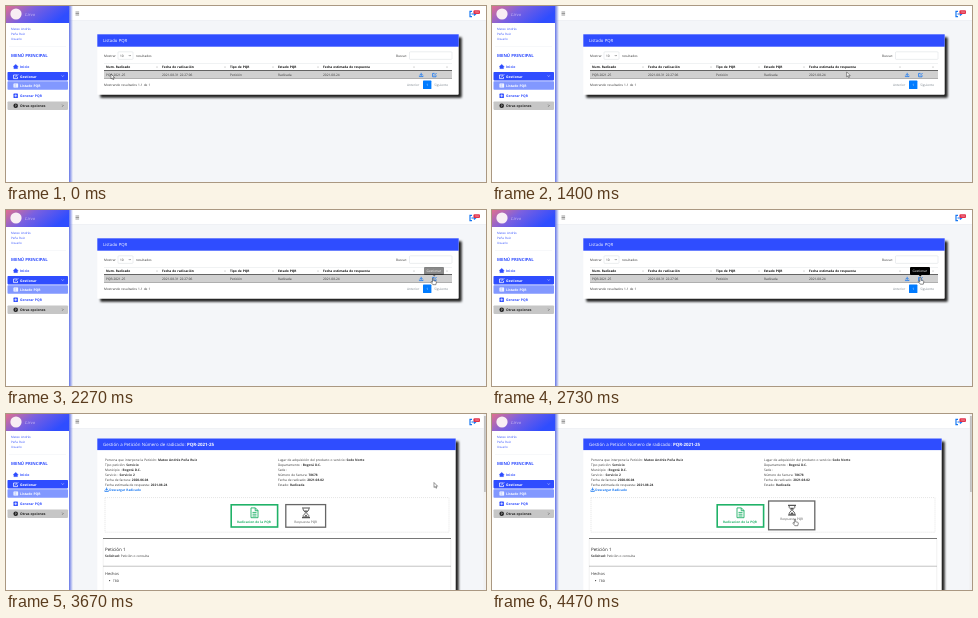
An HTML page for the animation above (4670 ms loop, 480 by 176 pixels).

```html
<!DOCTYPE html>
<html lang="es">
<head>
<meta charset="utf-8">
<title>Listado PQR</title>
<style>
html, body { margin: 0; width: 100%; height: 100%; overflow: hidden; background: #f4f6f9; }
svg { display: block; width: 100vw; height: 100vh; }
text { font: 3.2px "Open Sans", "Noto Sans", sans-serif; word-spacing: .2px; text-rendering: geometricPrecision; white-space: pre; }
.b { font-weight: 700; }
.head { filter: drop-shadow(3px 3px .9px #222); }
</style>
</head>
<body>
<svg id="stage" viewBox="0 0 480 176" preserveAspectRatio="none"></svg>
<script>
const BLUE = '#2f4dff', LINK = '#1677f2', GREEN = '#20b268', LOOP = 4670;
const stage = document.getElementById('stage');

const text = (x, y, s, { size = 3.2, fill = '#333', weight = 400 } = {}) =>
  `<text x="${x}" y="${y}" style="font-size:${size}px;fill:${fill};font-weight:${weight}">${s}</text>`;
const rect = (x, y, w, h, fill, extra = '') =>
  `<rect x="${x}" y="${y}" width="${w}" height="${h}" fill="${fill}" ${extra}/>`;
const path = (d, stroke, width = .7, fill = 'none') =>
  `<path d="${d}" fill="${fill}" stroke="${stroke}" stroke-width="${width}"/>`;
const field = (label, value = '') => `${label} <tspan class="b">${value}</tspan>`;
const download = (x, y) =>
  path(`M${x + 1.8} ${y}v2.6M${x + .5} ${y + 1.3}l1.3 1.3l1.3-1.3M${x} ${y + 2.8}v1h3.6v-1`, LINK, .8);

const menuItem = (y, label, fill, icon, back) =>
  (back ? rect(1.5, y - 5.6, 60.5, 8.5, back, 'rx=".8"') : '') + icon +
  text(14, y, label, { size: 3.4, fill, weight: 700 });

const sidebar = `
  ${rect(63, 0, 4, 176, 'url(#edge)')}${rect(0, 0, 63, 176, '#fff')}
  ${rect(0, 0, 63, 17, 'url(#brand)')}
  <circle cx="10" cy="8" r="5.6" fill="#f8eef4"/>
  <text x="19" y="10" style="font:italic 4px 'Noto Serif',serif;fill:#c9b8f2">Lirvo</text>
  ${['Mateo Andrés', 'Peña Ruiz', 'Usuario'].map((s, i) => text(5, 24 + 5 * i, s, { size: 3, fill: BLUE })).join('')}
  ${rect(3, 40, 57, .3, '#e3e6ee')}
  ${text(5, 51, 'MENÚ PRINCIPAL', { size: 4.25, fill: BLUE, weight: 700 })}
  ${menuItem(61.7, 'Inicio', BLUE, path('M7 60.7l2.7-2.4l2.7 2.4h-.8v2h-3.8v-2z', BLUE, .2, BLUE))}
  ${menuItem(71.5, 'Gestionar', '#fff', path('M7.5 69h3.5M7.5 69v3.6h4v-1.7M9 71.5l3.2-3.2', '#fff'), BLUE)}
  ${path('M55.7 69.5l1 1l1-1', '#fff', .5)}
  ${menuItem(80.8, 'Listado PQR', '#fff', rect(7.5, 77.4, 4.6, 4, '#fff', 'rx=".5"') + path('M8 78.8h3.6M8 80.2h3.6M9.3 77.8v3.3', '#8298ff', .3), '#8298ff')}
  ${menuItem(91, 'Generar PQR', BLUE, rect(7.5, 87.6, 4.4, 4.4, BLUE, 'rx=".6"') + path('M9.7 88.4v2.8M8.3 89.8h2.8', '#fff'))}
  ${menuItem(101, 'Otras opciones', '#222', '<circle cx="9.7" cy="99.7" r="2.3" fill="#222"/>' + text(8.9, 100.9, '?', { fill: '#fff', weight: 700 }), '#c6c6c6')}
  ${path('M56.2 98.7l1 1l-1 1', '#333', .5)}`;

const topbar = `
  ${rect(63, 0, 417, 14.5, '#fff')}${rect(63, 14.5, 417, .4, '#dfe3e8')}
  ${path('M69.5 6h3.6M69.5 7.5h3.6M69.5 9h3.6', '#555', .6)}
  ${path('M466 5.4h-2v5.2h2M465.5 8h4M468 6.3l1.7 1.7l-1.7 1.7', LINK, 1.2)}
  ${rect(467.5, 4.2, 6.5, 3.8, '#e2324b', 'rx="1"')}${text(468.7, 7.1, '100', { size: 2.4, fill: '#fff' })}`;

const columns = [
  [100, 'Num. Radicado', 'PQR-2021-25'],
  [156, 'Fecha de radicación', '2021-08-31 22:27:06'],
  [224, 'Tipo de PQR', 'Petición'],
  [272, 'Estado PQR', 'Radicada'],
  [317, 'Fecha estimada de respuesta', '2021-08-24'],
];
const control = (x, w) => rect(x, 45.8, w, 7.6, '#fff', 'rx=".8" stroke="#cfd4da" stroke-width=".4"');

const listPage = `<g id="list">
  <g class="head">${rect(91.3, 28.3, 361.4, 60.5, '#fff', 'rx=".8"')}</g>
  ${rect(91.3, 28.3, 361.4, 12.4, BLUE)}
  ${text(97, 36.2, 'Listado PQR', { size: 4.25, fill: '#fff' })}
  ${text(98, 51, 'Mostrar')}${control(112, 15)}${text(114, 51, '10')}
  ${path('M122.8 49.1l1 1l1-1', '#333', .5)}${text(130, 51, 'resultados')}
  ${text(390, 51, 'Buscar:')}${control(403.5, 42.5)}
  ${rect(98, 57, 348, .35, '#d5d9dd')}
  ${rect(98, 65, 348, 7.5, '#d0d0d0')}${rect(98, 64.2, 348, .7, '#222')}${rect(98, 72.4, 348, .5, '#777')}
  ${columns.map(([x, title, value]) => text(x, 62, title, { fill: '#111', weight: 700 }) + text(x, 69.8, value)).join('')}
  ${[151, 219, 267, 312, 408, 441].map(x => path(`M${x - .8} 60.8h1.6l-.8 1z`, 'none', 0, '#999')).join('')}
  ${download(413.4, 66.8)}
  ${path('M428.6 67.4h-2v3.4h3.4v-1.6M428 69.6l2.6-2.6', LINK, .8)}
  ${text(98, 80, 'Mostrando resultados 1-1 de 1')}
  ${text(401, 80, 'Anterior', { fill: '#7c858d' })}
  ${rect(417, 74.6, 8.4, 8.5, '#007bff', 'rx=".6"')}${text(420.3, 80, '1', { fill: '#fff' })}
  ${text(428.3, 80, 'Siguiente', { fill: '#7c858d' })}
  <g id="tip">${rect(418, 57, 20, 8, '#000', 'rx="1"')}${path('M426.8 65h2.8l-1.4 1.5z', 'none', 0, '#000')}
    ${text(420.6, 62.2, 'Gestionar', { fill: '#fff' })}</g>
</g>`;

const left = [
  field('Persona que interpone la Petición:', 'Mateo Andrés Peña Ruiz'),
  field('Tipo petición:', 'Servicio'),
  field('Municipio :', 'Bogotá D.C.'),
  field('Servicio :', 'Servicio 2'),
  field('Fecha de factura:', '2020-06-04'),
  field('Fecha estimada de respuesta:', '2021-08-24'),
];
const right = [
  field('Lugar de adquisición del producto o servicio:', 'Sede Norte'),
  field('Departamento :', 'Bogotá D.C.'),
  field('Sede :'),
  field('Número de factura:', '78678'),
  field('Fecha de radicado:', '2021-08-02'),
  field('Estado:', 'Radicada'),
];
const lines = (x, list) => list.map((s, i) => text(x, 46.7 + 5.08 * i, s)).join('');

const detailPage = `<g id="detail">
  <g class="head">${rect(91.3, 24.5, 358.4, 160, '#fff')}</g>
  ${rect(91.3, 24.5, 358.4, 11.6, BLUE)}
  ${text(97, 32.2, 'Gestión a Petición Número de radicado: <tspan class="b">PQR-2021-25</tspan>', { size: 4.43, fill: '#fff' })}
  ${lines(99, left)}${lines(272, right)}
  ${download(98.8, 73.6)}${text(103.3, 77.2, 'Descargar Radicado', { fill: LINK, weight: 700 })}
  ${rect(99, 83.6, 344, 34.6, '#fff', 'stroke="#bbb" stroke-width=".4" stroke-dasharray="1 1"')}
  ${rect(225.2, 90.8, 46.4, 22.2, '#fff', `stroke="${GREEN}" stroke-width="1.6"`)}
  ${path('M245 93.9h4.4l2.6 2.6v7.2h-7zM249.2 93.9v2.8h2.8M246.5 98.4h4M246.5 100.2h4M246.5 102h4', GREEN, .9)}
  ${text(231, 109.2, 'Radicacion de la PQR', { fill: GREEN, weight: 700 })}
  <rect id="answer" fill="#fff" stroke="#666" stroke-width="1.3"/>
  <g id="answerLabel">
    ${path('M296 94h8M296 103.6h8', '#555', 1.2)}
    ${path('M297.2 94.4v1.6l2.4 2.8l-2.4 2.8v1.8h5.6v-1.8l-2.4-2.8l2.4-2.8v-1.6', '#555', .9)}
    ${path('M298 96.4h4l-2 2.2zM298 102.8l2-2.2l2 2.2z', 'none', 0, '#555')}
    ${text(288.3, 109, 'Respuesta PQR', { fill: '#555' })}
  </g>
  ${path('M97.2 125v51M444.8 125v51', '#ddd', .4)}
  ${rect(97, 124.2, 348, .8, '#555')}
  ${text(99, 136.5, 'Petición 1', { size: 4.5, fill: '#222', weight: 500 })}
  ${text(99, 142.8, '<tspan class="b">Solicitud:</tspan> Petición o consulta')}
  ${rect(97, 151.8, 348, .7, '#aaa')}
  ${text(99, 161, 'Hechos', { size: 4 })}
  <circle cx="103.6" cy="166.6" r=".6" fill="#333"/>${text(107, 167.8, 'TBD')}
  ${rect(477.6, 0, 2.4, 176, '#f1f1f1')}${rect(478, 2, 1.8, 76, '#c1c1c1')}
</g>`;

stage.innerHTML = `<defs>
    <linearGradient id="brand" x2="1" y2=".35"><stop stop-color="#e0708f"/><stop offset=".45" stop-color="#7a60e0"/><stop offset="1" stop-color="${BLUE}"/></linearGradient>
    <linearGradient id="edge"><stop stop-color="#6475e6"/><stop offset="1" stop-color="#6475e6" stop-opacity="0"/></linearGradient>
  </defs>
  ${rect(0, 0, 480, 176, '#f4f6f9')}${topbar}${listPage}${detailPage}${sidebar}
  <g id="cursor">
    <path id="arrow" d="M0 0v5l1.2-1l.8 1.8l.8-.4l-.8-1.7h1.6z" fill="#fff" stroke="#222" stroke-width=".45"/>
    <path id="hand" d="M-.6 .5q.6-1 1.2 0v2.3l2.2 .5q.6 .2 .5 1l-.5 2.4h-3l-2-2.6q.2-.9 1-.3l.6 .5z" fill="#fff" stroke="#222" stroke-width=".5"/>
  </g>`;

const el = id => document.getElementById(id);
const show = (id, on) => el(id).setAttribute('visibility', on ? 'visible' : 'hidden');
const ramp = (t, a, b) => { const u = Math.min(1, Math.max(0, (t - a) / (b - a))); return u * u * (3 - 2 * u); };

// Pointer waypoints: time, x, y
const route = [
  [0, 105, 68], [70, 105, 68], [500, 230, 69], [930, 360.5, 65], [1200, 363, 66], [1800, 331, 65.5],
  [2200, 427, 68], [2730, 428.5, 67.5], [3330, 428.5, 67.5], [3530, 428, 68.5], [3670, 428, 68.5],
  [3930, 331.3, 80.3], [4130, 326, 86], [4400, 303, 105], [LOOP, 303, 105],
];
function pointer(t) {
  const i = route.findIndex(p => p[0] > t);
  const [a, b] = [route[i - 1], route[i]], u = ramp(t, a[0], b[0]);
  return [a[1] + (b[1] - a[1]) * u, a[2] + (b[2] - a[2]) * u];
}

function draw(now) {
  const t = now % LOOP, detail = t >= 3670;
  show('list', !detail);
  show('detail', detail);
  el('tip').setAttribute('opacity', ramp(t, 2200, 2350));

  const grow = ramp(t, 4200, 4400), answer = el('answer');
  const box = { x: 279.8 - 3.2 * grow, y: 90.6 - 3.6 * grow, width: 39.8 + 6.4 * grow, height: 22.6 + 6.2 * grow };
  for (const key in box) answer.setAttribute(key, box[key]);
  el('answerLabel').setAttribute('transform', `translate(0 ${-2.6 * grow})`);

  const hand = (t >= 1670 && !detail) || t >= 4270;
  show('hand', hand);
  show('arrow', !hand);
  el('cursor').setAttribute('transform', `translate(${pointer(t)})`);
  requestAnimationFrame(draw);
}
draw(performance.now());
</script>
</body>
</html>
```
